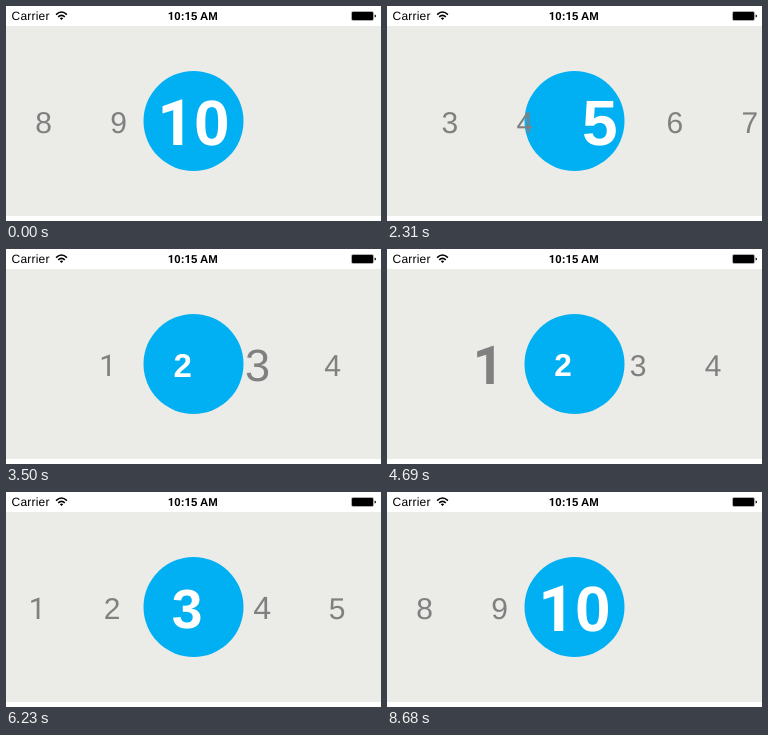
These frames come from a looping animation (375 px wide and 215 px high, 9.66 s). An HTML page:

```html
<!DOCTYPE html>
<html lang="en">
<head>
<meta charset="utf-8">
<title>Number picker</title>
<style>
  html, body { margin: 0; width: 100%; height: 100%; overflow: hidden; background: #fff; }
  svg { display: block; width: 375px; height: 215px; }
  text { font-family: "Liberation Sans", Arial, sans-serif; text-rendering: geometricPrecision; }
  .one { font-family: Roboto, sans-serif; }
  #digits text { text-anchor: middle; }
</style>
</head>
<body>
<svg viewBox="0 0 375 215">
  <rect width="375" height="215" fill="#fff"/>
  <rect y="20" width="375" height="190" fill="#ebebe7"/>
  <text x="5.6" y="14.2" font-size="12" letter-spacing=".2">Carrier</text>
  <g fill="none" stroke="#000" stroke-width="1.6">
    <path d="M50.1 8.6Q55.5 3.4 60.9 8.6"/>
    <path d="M52.2 10.9Q55.5 7.7 58.8 10.9"/>
  </g>
  <path d="M53.8 12.2Q55.5 10.8 57.2 12.2L55.5 14Z"/>
  <text x="186.8" y="14.2" font-size="11.4" font-weight="bold" text-anchor="middle"><tspan class="one">1</tspan>0:<tspan class="one">1</tspan>5 AM</text>
  <rect x="345.5" y="5.5" width="22" height="9" rx="1.5" fill="none" stroke="#777" stroke-width=".6"/>
  <rect x="346" y="6" width="21" height="8" rx=".8"/>
  <path d="M368.6 8.4Q370 8.6 370 10T368.6 11.6Z"/>
  <circle cx="187.5" cy="115" r="50" fill="#00b0f3"/>
  <g id="digits"></g>
</svg>
<script>
const LOOP = 9660, TICK = 70, COUNT = 10;
const CENTER = 187.5, GAP = 75, SMALL = 30, BIG = 64, RESIZE = 300;

// Each move: start ms, ticks, from, to, slow-in exponent, slow-out exponent
const moves = [
  [980, 28, 10, 4, 1, 1.76],
  [3010, 14, 4, 0.84, 2.5, 3.12],
  [3990, 6, 0.84, 1, 1, 2],
  [4690, 10, 1, 4, 1, 4.6],
  [5740, 12, 4, 3, 2.5, 5.5],
  [6790, 10, 3, 8, 1, 4.66],
  [8050, 10, 8, 10, 1, 4.6]
];

const clamp = (v, lo, hi) => Math.min(hi, Math.max(lo, v));

function position(t) {
  let pos = 10;
  for (const [start, ticks, from, to, a, p] of moves) {
    const u = clamp((t - start + TICK) / (ticks * TICK), 0, 1);
    if (u > 0) pos = to + (from - to) * (1 - u ** a) ** p;
  }
  return pos;
}

const selected = t => clamp(Math.round(position(t)), 1, COUNT);

// Selection changes over one loop; sizes ease from wherever they were.
const changes = [];
for (let t = 5, last = COUNT; t < LOOP; t += 5) {
  const now = selected(t);
  if (now !== last) changes.push({ t, off: last, on: now });
  last = now;
}

function growth(n, t) {
  let from = n === COUNT ? 1 : 0, to = from, start = 0;
  const at = time => {
    const u = clamp((time - start) / RESIZE, 0, 1);
    const e = to ? u * u * (3 - 2 * u) : 1 - (1 - u) ** 2.5;
    return from + (to - from) * e;
  };
  for (const c of changes) {
    if (c.t > t) break;
    if (c.on !== n && c.off !== n) continue;
    from = at(c.t);
    to = c.on === n ? 1 : 0;
    start = c.t;
  }
  return at(t);
}

const group = document.getElementById("digits");
const labels = Array.from({ length: COUNT }, (_, i) => {
  const label = document.createElementNS(group.namespaceURI, "text");
  // The figure 1 is set in a face that draws it without a foot.
  label.innerHTML = String(i + 1).replace("1", '<tspan class="one">1</tspan>');
  return group.appendChild(label);
});

function draw(t) {
  const pos = position(t), active = selected(t);
  labels.forEach((label, i) => {
    const n = i + 1, g = growth(n, t), size = SMALL + (BIG - SMALL) * g;
    const set = (name, value) => label.setAttribute(name, value);
    set("x", CENTER + (n - pos) * GAP);
    set("y", 115.8 + size * 0.36);
    set("font-size", size);
    set("font-weight", n === active || g > 0.5 ? "bold" : "normal");
    set("fill", n === active ? "#fff" : "#808080");
  });
}

const origin = performance.now();
function frame() {
  const t = (performance.now() - origin) % LOOP;
  draw(Math.floor(t / TICK) * TICK);
  requestAnimationFrame(frame);
}
frame();
</script>
</body>
</html>
```
